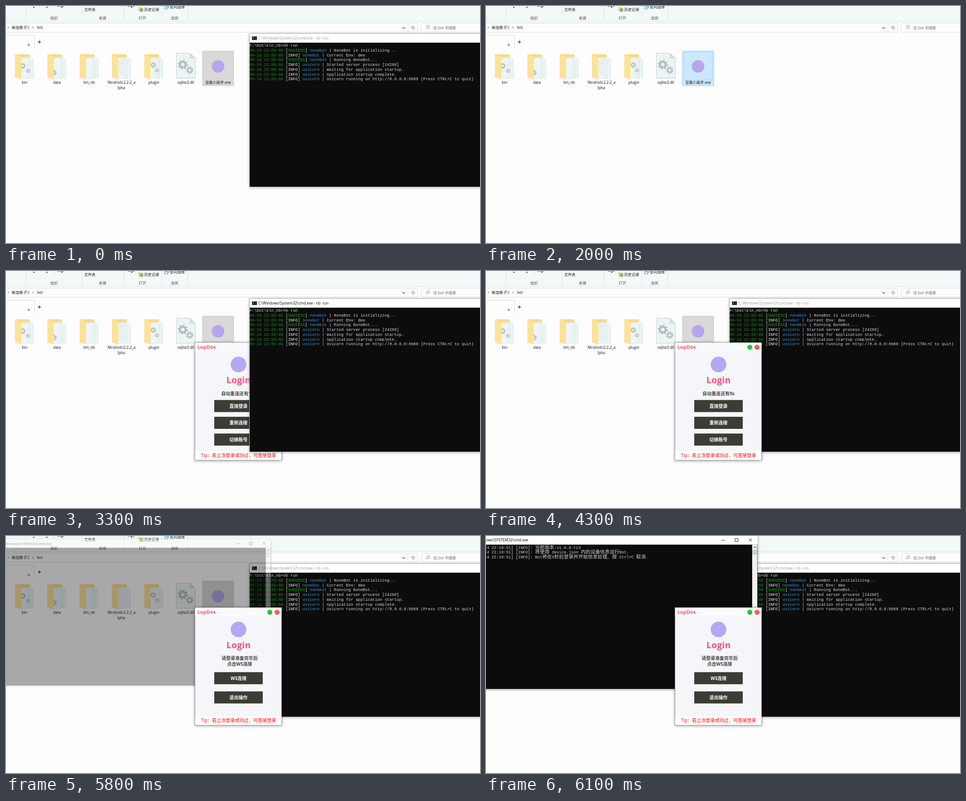
An HTML page that plays this animation: 1056 by 530 pixels, repeating every 8 s.

```html
<!DOCTYPE html>
<html lang="zh">
<head>
<meta charset="utf-8">
<title>Bot launch</title>
<style>
html, body { margin: 0; width: 100%; height: 100%; overflow: hidden; background: #fdfdfd; }
svg { display: block; }
text { font: 8.3px "Open Sans", "Noto Sans CJK SC", "Noto Sans CJK", sans-serif; white-space: pre; }
.mono, .mono tspan { font-family: "Liberation Mono", "Noto Sans CJK SC", "Noto Sans CJK", monospace; font-size: 8.96px; }
.mono .wide { font-family: "Noto Sans CJK SC", "Noto Sans CJK", sans-serif; font-size: 10.73px; }
.mid { text-anchor: middle; }
.end { text-anchor: end; }
.ui { font-size: 10.1px; }
.bold { font-weight: 700; }
.shadow { filter: drop-shadow(0 1px 3px rgba(0, 0, 0, .4)); }
</style>
</head>
<body>
<svg id="stage" width="1056" height="530" viewBox="0 0 1056 530"></svg>
<script>
const LOOP = 8000;
const stage = document.getElementById('stage');

const rect = (x, y, w, h, fill, extra = '') =>
  `<rect x="${x}" y="${y}" width="${w}" height="${h}" fill="${fill}" ${extra}/>`;
const line = (d, color, width = 1, extra = '') =>
  `<path d="${d}" fill="none" stroke="${color}" stroke-width="${width}" ${extra}/>`;
const shape = (d, fill, extra = '') => `<path d="${d}" fill="${fill}" ${extra}/>`;
const disc = (x, y, r, fill) => `<circle cx="${x}" cy="${y}" r="${r}" fill="${fill}"/>`;
const text = (x, y, s, cls = '', fill = '#111', extra = '') =>
  `<text x="${x}" y="${y}" class="${cls}" fill="${fill}" ${extra}>${s}</text>`;
const group = (id, body, extra = '') => `<g id="${id}" ${extra}>${body}</g>`;

function gear(x, y, r, color) {
  const tooth = 2 * Math.PI * r / 16;
  return `<g fill="none" stroke="${color}">
    <circle cx="${x}" cy="${y}" r="${r * .65}" stroke-width="${r * .45}"/>
    <circle cx="${x}" cy="${y}" r="${r}" stroke-width="${r * .35}" stroke-dasharray="${tooth}"/></g>`;
}

// Explorer

function folder(i, name, inner = '') {
  const sheet = (x, y) => shape(`M${x} ${y}h14l6 6V161h-20z`, '#ecf5f5', 'stroke="#cbd9da" stroke-width=".7"');
  return `<g transform="translate(${i * 72})">
    ${shape('M20 108H51q2 0 2 2V160H20z', '#fbdb80')}
    ${sheet(41, 114)}${sheet(34, 115)}
    ${shape('M31 118L49 115V162L31 163z', '#edf5f6', 'stroke="#d3dfe1" stroke-width=".6"')}
    ${inner}
    ${shape('M20 108L34 114V164L20 160z', '#ffe294')}
    </g>` + text(41.5 + i * 72, 174, name, 'mid');
}

function ribbon() {
  const arrows = [62, 91, 124.5, 280].map(x => shape(`M${x - 2} 2h4l-2 2.5z`, '#222')).join('');
  const splits = [45, 170, 263, 348, 405].map(x => line(`M${x - .5} 0V33`, '#dde2e3')).join('');
  const captions = [[107, '组织'], [215.5, '新建'], [304, '打开'], [375.5, '选择']]
    .map(([x, s]) => text(x, 30, s, 'mid', '#555')).join('');
  return rect(0, 0, 1056, 35, '#f3f8f8') + line('M0 35H1056', '#dadfe0') + splits + arrows + captions +
    line('M107.5 0V10', '#dde2e3') + line('M115 .5h14M271 .5h16', '#444', 1, 'stroke-dasharray="4 1.5"') +
    text(174.5, 10.5, '文件夹') + text(308, 10.5, '历史记录') + text(365, 4.5, '反向选择') +
    shape('M295 2h4l1 1.5h6V12h-11z', '#f3d67c') + disc(302, 9, 4, '#5fb85f') +
    line('M302 6.5V9H304', '#fff') +
    rect(356.5, -2, 6, 6, '#b9dbf5', 'stroke="#5b9bd2"') + rect(353.5, 1.5, 6, 5.5, '#e0f0fb', 'stroke="#5b9bd2"');
}

function addressBar() {
  return line('M0 38.5H916.5V58.5H0M895.5 38.5V58.5', '#dcdcdc') +
    line('M1056 38.5H925.5V58.5H1056', '#dcdcdc') +
    line('M4 46l2 2.3-2 2.3M59 46l2 2.3-2 2.3', '#444', .9) +
    text(13, 51.3, '新加卷 (F:)') + text(69, 51.3, 'bot') +
    line('M883 47.5l3 3 3-3', '#444', 1.1) +
    line('M904.9 46.6A2.9 2.9 0 1 0 908.5 46M904.4 45.4h2.4v2.4', '#444', .9) +
    '<circle cx="940.5" cy="47" r="2.8" fill="none" stroke="#777" stroke-width=".9"/>' +
    line('M938.5 49l-3 3', '#777', .9) + text(952, 51.5, '在 bot 中搜索', '', '#666');
}

function explorer() {
  const gray = '#b9c1c6';
  return rect(0, 0, 1056, 530, '#fdfdfd') + ribbon() + addressBar() +
    line('M0 65.5H63.5V96', '#d8d8d8') + line('M48.5 84.5l4.5 5M53 84.5l-4.5 5', '#555', 1.1) +
    line('M71 80.5h7M74.5 77v7', '#1c2fd0', 1.4) +
    folder(0, 'bin', gear(37, 134, 6, gray) + gear(49, 145, 4, gray)) +
    folder(1, 'data', gear(34, 149, 6, gray)) +
    folder(2, 'kln_nb') +
    folder(3, 'Ntraholic2.2.2_a', line('M37 120V156M41 119V156M45 118V156', '#dfe3ea', 1.5)) +
    text(257, 185.5, 'lpha', 'mid') +
    folder(4, 'plugin', gear(40, 132, 5.5, gray) + gear(48, 144, 4, gray)) +
    rect(366, 100, 70, 79, '#e5f3ff', 'id="hover"') +
    shape('M379.5 105.5H410L421.5 117V161.5H379.5z', '#ecf4f4', 'stroke="#c3cecf"') +
    shape('M410 105.5V117H421.5z', '#d8e0e1', 'stroke="#c3cecf" stroke-width=".7"') +
    gear(394, 131, 9.5, '#b4bcc1') + gear(409.5, 143.5, 7, '#b4bcc1') +
    text(400.5, 174, 'sqlite3.dll', 'mid') +
    rect(437.5, 100.5, 70, 78, '#d9d9d9', 'id="selected"') +
    rect(440.5, 103.5, 64, 62, 'none', 'id="inset" stroke="#a9d6fa"') +
    disc(472.5, 135, 14, '#b7a6ea') +
    text(472.5, 174, '豆栗小助手.exe', 'mid');
}

// Consoles

const span = (fill, s) => `<tspan fill="${fill}">${s}</tspan>`;
const widen = s => s.replace(/[\u3000-\u9fff]+/g, run => `<tspan class="wide">${run}</tspan>`);

function serverConsole() {
  const log = [
    ['SUCCESS', 'nonebot', 'NoneBot is initializing...'],
    ['INFO', 'nonebot', 'Current ' + span('#f9f1a5', 'Env: dev')],
    ['SUCCESS', 'nonebot', 'Running NoneBot...'],
    ['INFO', 'uvicorn', 'Started server process [24280]'],
    ['INFO', 'uvicorn', 'Waiting for application startup.'],
    ['INFO', 'uvicorn', 'Application startup complete.'],
    ['INFO', 'uvicorn', 'Uvicorn running on http://0.0.0.0:8080 (Press CTRL+C to quit)']
  ].map(([level, source, message], i) => text(542.5, 102 + i * 10.7,
    span('#13930e', '09-24 22:09:06 ') + '[' + span(level === 'INFO' ? '#f2f2f2' : '#16b60c', level) + '] ' +
    span('#3a96dd', source) + ' | ' + message, 'mono', '#d6d6d6')).join('');
  return rect(543, 62, 530, 342, '#0c0c0c', 'class="shadow"') +
    rect(543, 62, 513, 20, '#fff') + line('M1056 404.5H542.5V61.5H1056', '#a8a8a8') +
    rect(548, 67, 11, 9, '#111') + rect(548, 67, 11, 1.5, '#bbb') +
    line('M550 70.5h2M550 73.5h2M553.5 70.5h1M555.5 73.5h2', '#fff') +
    text(562, 74.7, 'C:\\Windows\\System32\\cmd.exe - nb  run', '', '#000', 'id="serverTitle"') +
    text(542.5, 91.3, 'F:\\bot\\kln_nb&gt;nb run', 'mono', '#d6d6d6') + log +
    rect(543, 176, 5, 3, '#ccc', 'id="caret"');
}

function botConsole() {
  const lines = ['当前版本:v1.0.0-rc3', '将使用 device.json 内的设备信息运行Bot.',
    'Bot将在5秒后登录并开始信息处理, 按 Ctrl+C 取消.']
    .map((s, i) => text(-52, 28.6 + i * 10.7, widen('[2022-09-24 22:10:51] [INFO]: ' + s), 'mono', '#d6d6d6')).join('');
  return rect(-53, -1, 658, 343, '#0c0c0c', 'class="shadow"') +
    rect(-53, -1, 658, 20.3, '#fff') +
    text(94, 12.2, 'C:\\Windows\\SYSTEM32\\cmd.exe', 'end', '#000') +
    line('M525 9.5h7M585.5 5.5l7 7M592.5 5.5l-7 7', '#222') +
    rect(555, 6, 6.5, 6.5, 'none', 'stroke="#222"') +
    rect(593, 19.3, 11.5, 322.5, '#f0f0f0') + line('M596.5 26.5l2.5-2.5 2.5 2.5', '#444', 1.2) +
    rect(593.5, 31, 10.5, 11, '#cdcdcd') + group('botLog', lines);
}

// Login dialog

const button = (y, label) => rect(464, y, 108, 27, '#3c3c37') +
  text(518, y + 17.2, label, 'mid ui bold', '#fff');

function loginDialog() {
  const pressed = rect(464, 288.5, 108, 27, '#f5f7fa') +
    rect(465, 289.5, 105.5, 24.5, '#3c3c37', 'stroke="#55554f"') +
    text(518, 306.7, '直接登录', 'mid ui bold', '#1583e0');
  return rect(421, 160, 193, 263, '#f5f6fa', 'class="shadow" stroke="#777" stroke-width=".8"') +
    rect(421.5, 160.5, 192, 19.5, '#f9fafb') + rect(421.5, 403, 192, 19.5, '#fdfdfe') +
    text(426.5, 174.3, 'LopDex', 'bold', '#fb4f84', 'style="font-size:11px"') +
    disc(587.7, 170.5, 5.5, '#14cc3c') + disc(603.8, 170.5, 5.5, '#fd5b4e') +
    disc(518, 209, 17.5, '#b3a8f5') +
    text(518, 250.5, 'Login', 'mid bold', '#f8517f', 'style="font-size:20px"') +
    group('reconnect',
      text(518, 278.4, '', 'mid ui bold', '#444', 'id="countdown"') +
      button(288.5, '直接登录') + group('pressed', pressed) +
      button(326, '重新连接') + button(363.5, '切换账号')) +
    group('ready',
      text(520.5, 277, '请登录准备完毕后', 'mid ui bold', '#444') +
      text(520.5, 290, '点击WS连接', 'mid ui bold', '#444') +
      button(304.5, 'WS连接') + button(347.5, '退出操作')) +
    text(518, 416, 'Tip：若上次登录成功过，可直接登录', 'mid', '#f00', 'style="font-size:10.2px"');
}

stage.innerHTML = group('explorer', explorer()) + group('server', serverConsole()) +
  group('bot', botConsole()) + group('login', loginDialog());

const el = id => document.getElementById(id);
const show = (id, on) => el(id).setAttribute('display', on ? 'inline' : 'none');
const set = (id, name, value) => el(id).setAttribute(name, value);

function render(t) {
  const hot = t >= 600 && t < 3000;
  const focused = t >= 600 && t < 3300;
  set('selected', 'fill', focused ? '#cce8ff' : '#d9d9d9');
  set('selected', 'stroke', hot ? '#99d1ff' : focused ? '#cce8ff' : '#d3d3d3');
  show('inset', hot);
  show('hover', t >= 4700 && t < 4800);

  show('server', t < 2000 || t >= 3300);
  set('serverTitle', 'fill', t >= 3300 && t < 4200 ? '#000' : '#999');
  show('caret', t >= 3800 && t < 4200);

  show('login', t >= 3300);
  stage.insertBefore(el('login'), t < 4200 ? el('server') : null);
  el('countdown').textContent = `自动重连还有${t < 4100 ? 10 : t < 5000 ? 9 : 8}s`;
  show('pressed', t >= 5300);
  show('reconnect', t < 5800);
  show('ready', t >= 5800);

  // The console opens in 100 ms steps, growing about its centre.
  const step = Math.min(3, Math.floor((t - 5800) / 100));
  show('bot', step >= 0);
  if (step >= 0) {
    const scale = [.955, .988, .997, 1][step];
    set('bot', 'opacity', [.35, .785, .96, 1][step]);
    set('bot', 'transform', `translate(276 175) scale(${scale}) translate(-276 -175)`);
  }
  show('botLog', step === 3);
}

const start = performance.now();
function tick() {
  render((performance.now() - start) % LOOP);
  requestAnimationFrame(tick);
}
tick();
</script>
</body>
</html>
```
